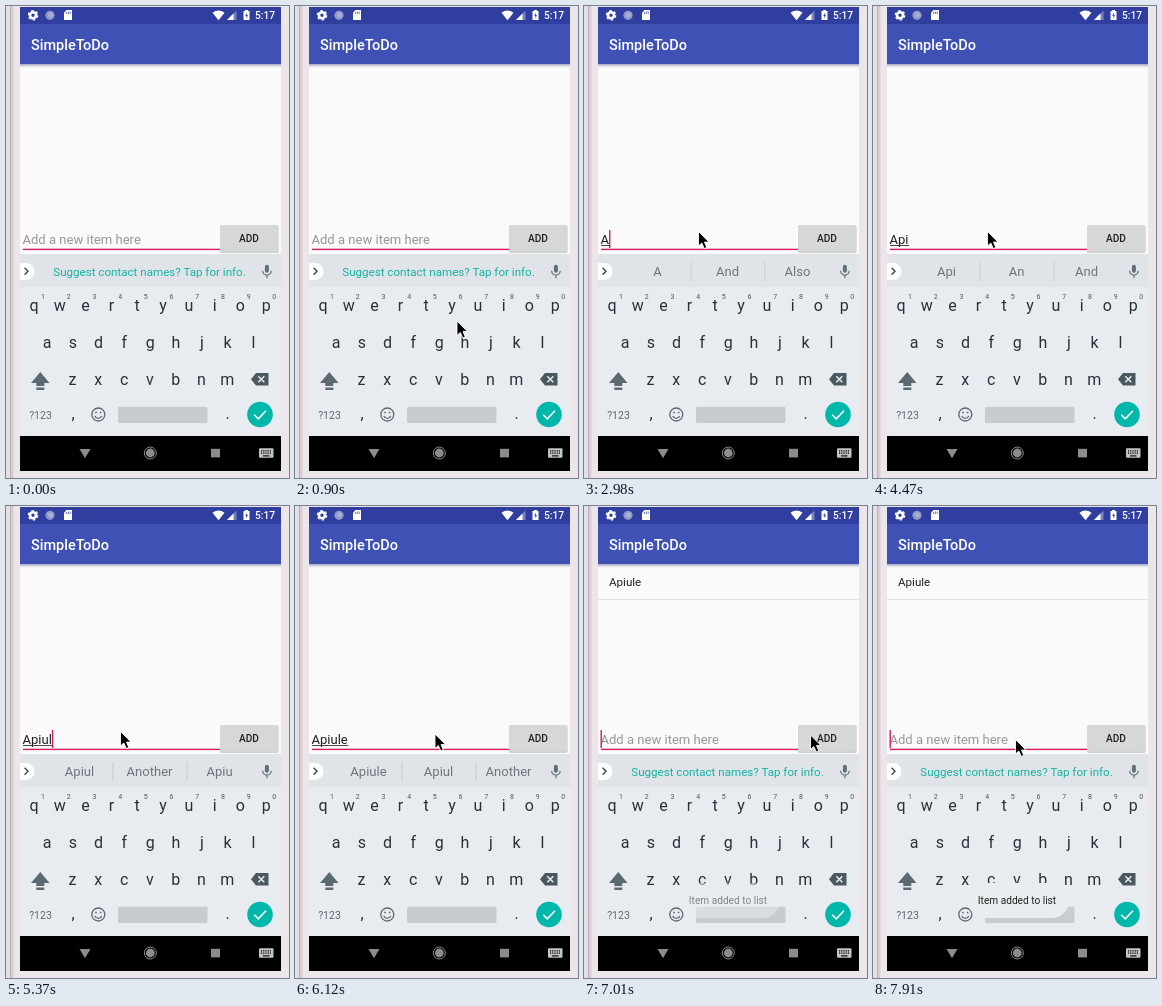
Recreate the animation shown at these times as an HTML page. Size 283 by 472 pixels, loop 8 s.

```html
<!DOCTYPE html>
<html lang="en">
<head>
<meta charset="utf-8">
<title>To-do entry</title>
<style>
  html, body { margin: 0; width: 100%; height: 100%; overflow: hidden; background: #ece6ea; }
  svg { display: block; width: 283px; height: 472px; font-family: Roboto, sans-serif; }
  .mid { text-anchor: middle; }
  .edit { font-size: 13.05px; }
  .hint { fill: #979797; }
  .medium { font-weight: 500; }
  #keys { font-size: 16px; fill: #263238; }
  #keys .digit { font-size: 7px; fill: #4c585e; }
  #words { font-size: 13.05px; fill: #6b767c; }
</style>
</head>
<body>
<svg viewBox="0 0 283 472">
  <!-- window edge -->
  <rect width="283" height="472" fill="#ece6ea"/>
  <rect width="4" height="472" fill="#e4dfe2"/>
  <rect x="4" width="1.5" height="472" fill="#bcb0b6"/>
  <rect x="5.5" width="2" height="472" fill="#d9ced4"/>

  <!-- app -->
  <rect x="14" y="58" width="261" height="191" fill="#fafafa"/>
  <rect x="14" y="1" width="261" height="17.5" fill="#303f9f"/>
  <rect x="14" y="18" width="261" height="40.5" fill="#3f51b5"/>
  <rect x="14" y="58.5" width="261" height="1.5" fill="#c6c7cc"/>
  <rect x="14" y="60" width="261" height="1.5" fill="#ececee"/>
  <text class="medium" x="25" y="44" font-size="14.5" fill="#fff">SimpleToDo</text>

  <!-- status icons -->
  <g fill="#fff">
    <circle cx="27" cy="9.3" r="3" fill="none" stroke="#fff" stroke-width="2.6"/>
    <circle cx="27" cy="9.3" r="4.7" fill="none" stroke="#fff" stroke-width="1.2" stroke-dasharray="2.6 2.32"/>
    <circle cx="44" cy="9.3" r="4.6" fill="#8f9acb"/>
    <circle cx="44.5" cy="9" r="2.4" fill="#a9b1d8"/>
    <path d="M60.5 4H66V14H58V6.7Z"/>
    <path d="M60.6 6V8M62.4 5.5V8M64.2 5.5V8" stroke="#303f9f" stroke-width=".7"/>
    <path d="M206.5 6.8Q212.5 2.4 218.5 6.8L212.5 14.2Z"/>
    <path d="M221 14H230.5V4.5Z" opacity=".35"/>
    <path d="M221 14H227.5V7.5Z"/>
    <path d="M237.5 5H239V4H242V5H243.5V14H237.5Z"/>
    <path d="M241 6.5L239.2 9.8H240.4V12.5L242 9H240.8Z" fill="#303f9f"/>
    <text class="medium" x="249" y="13" font-size="10.2">5:17</text>
  </g>

  <g id="item">
    <rect x="14" y="93" width="261" height="1" fill="#e1e1e1"/>
    <text x="25" y="80" font-size="11.6" fill="#212121">Apiule</text>
  </g>

  <!-- input row -->
  <text class="edit hint" id="hint" x="16.5" y="238">Add a new item here</text>
  <text class="edit" id="typed" x="16.5" y="238" fill="#212121"></text>
  <rect id="composing" x="17" y="239" height=".9" fill="#333"/>
  <rect x="17" y="242.7" width="197" height="1.4" fill="#d81b60"/>
  <rect id="caret" y="224" width="1.4" height="18" fill="#d81b60"/>
  <rect x="214" y="219.5" width="58.5" height="27.2" rx="1.5" fill="#c2c3c3"/>
  <rect id="button" x="214" y="219" width="58" height="26.8" rx="1.5"/>
  <text class="medium mid" x="243" y="236" font-size="10.15" fill="#212121">ADD</text>

  <!-- keyboard -->
  <rect x="14" y="248" width="261" height="182" fill="#e8ecf0"/>
  <rect x="14" y="248" width="261" height="33" fill="#e0e4e8"/>
  <path d="M14 257H20A8.5 8.5 0 0 1 20 274H14Z" fill="#fff"/>
  <path d="M18.6 261.8L22 265.3L18.6 268.8" fill="none" stroke="#37474f" stroke-width="1.4"/>
  <text class="mid" id="info" x="143.5" y="269.6" font-size="11.6" fill="#12b3a3">Suggest contact names? Tap for info.</text>
  <g id="words" class="mid">
    <path d="M107 256V275M181 256V275" stroke="#c6cbcf"/>
    <text x="73.5" y="270"></text><text x="143.5" y="270"></text><text x="213.5" y="270"></text>
  </g>
  <rect x="258.9" y="258.8" width="4" height="8" rx="2" fill="#607078"/>
  <path d="M256.6 264.8A4.3 4.3 0 0 0 265.2 264.8M260.9 269V272.3" fill="none" stroke="#607078" stroke-width="1.2"/>

  <g id="keys" class="mid"></g>
  <path d="M34.3 366L43.5 377H38.3V380H30.3V377H25Z M30.3 381.5H38.3V384H30.3Z" fill="#5b6a72"/>
  <path d="M250 367H262.5V379.5H250L245 373.2Z" fill="#4a5860"/>
  <path d="M252.3 370.3L258.3 376.3M258.3 370.3L252.3 376.3" stroke="#e8ecf0" stroke-width="1.5"/>
  <text class="mid" x="34.5" y="412.5" font-size="10.5" fill="#5b6a72">?123</text>
  <g fill="none" stroke="#5b6a72" stroke-width="1.3">
    <circle cx="92.3" cy="408.5" r="6.5"/>
    <path d="M88.8 410A3.8 3.8 0 0 0 95.8 410"/>
    <path d="M89.2 406.5H90.8M93.8 406.5H95.4" stroke-width="1.7"/>
  </g>
  <rect x="112" y="400.8" width="89.5" height="16.2" rx="1.5" fill="#c8ccd0"/>
  <circle cx="254" cy="408.5" r="12.8" fill="#00b8a9"/>
  <path d="M248.2 408.8L252.3 412.8L260 404.8" fill="none" stroke="#fff" stroke-width="1.6"/>

  <!-- navigation bar -->
  <rect x="14" y="430" width="261" height="35" fill="#000"/>
  <g fill="#8c8c8c">
    <path d="M73.5 443H84.5L79 452.3Z"/>
    <circle cx="144.3" cy="447" r="4.4"/>
    <circle cx="144.3" cy="447" r="6" fill="none" stroke="#8c8c8c"/>
    <rect x="205" y="442.8" width="9" height="8.6"/>
    <rect x="253" y="442.3" width="14.5" height="9.4" rx="1" fill="#c4c4c4"/>
    <path d="M255 444.8H266M255 447.2H266" stroke="#000" stroke-width="1.2" stroke-dasharray="1.2 1"/>
    <path d="M257 449.9H263.5" stroke="#000" stroke-width="1.1"/>
  </g>

  <g id="toast">
    <rect x="95" y="377" width="101" height="35" rx="17" fill="#eaedf0"/>
    <text class="mid" x="144" y="398.3" font-size="10.15" fill="#212121">Item added to list</text>
  </g>
  <path id="pointer" d="M0 0V14.5L3.3 11.5L5.8 17L8.3 16L6 10.6H10.5Z" fill="#000" stroke="#fff" stroke-width=".9"/>
</svg>
<script>
const LOOP = 8000;
const $ = id => document.getElementById(id);

// Latest value whose start time has been reached.
const at = (track, t) => track.findLast(([start]) => start <= t)[1];

const entry = [
  [0, ''], [2980, 'A'], [3870, 'Ap'], [4020, 'Api'], [4620, 'Apiu'],
  [5370, 'Apiul'], [5520, 'Apiule'], [7010, '']
];
const suggestions = {
  A: ['And', 'Also'], Ap: ['An', 'And'], Api: ['An', 'And'], Apiu: ['An', 'Another'],
  Apiul: ['Another', 'Apiu'], Apiule: ['Apiul', 'Another']
};
const caretToggles = [
  150, 600, 1050, 1630, 2080, 2530, 2980, 3580, 3870, 4470,
  4620, 5070, 5370, 5970, 6420, 7460, 7910
];
const pointerTrack = [
  [0, null], [450, [168, 340]], [600, [168, 336]], [900, [162, 315]],
  [1050, [142, 270]], [1200, [120, 234]], [1340, [114.5, 225.5]],
  [5970, [117, 226]], [6120, [140, 228]], [6270, [178, 230]],
  [6420, [212, 230]], [6560, [226.5, 229]],
  [7160, [214, 226]], [7310, [168, 225]], [7460, [142.5, 233.5]]
];
const toastTrack = [[0, 0], [7010, 0.5], [7160, 1]];

const label = (x, y, text, cls = '') => `<text x="${x}" y="${y}" class="${cls}">${text}</text>`;
const keyRow = (letters, x, y) => [...letters].map((c, i) => label(x + i * 25.8, y, c)).join('');
$('keys').innerHTML =
  keyRow('qwertyuiop', 28, 305) + keyRow('asdfghjkl', 41, 341.5) + keyRow('zxcvbnm', 66.5, 378.5) +
  label(67, 413, ',') + label(221.5, 413, '.') +
  [...'1234567890'].map((d, i) => label(37 + i * 25.7, 293, d, 'digit')).join('');

const show = (id, on) => $(id).setAttribute('visibility', on ? 'visible' : 'hidden');

function draw(now) {
  const t = now % LOOP;
  const text = at(entry, t);
  $('typed').textContent = text;
  const width = text ? $('typed').getComputedTextLength() : 0;
  $('composing').setAttribute('width', width);
  $('caret').setAttribute('x', 16.5 + width);
  show('caret', caretToggles.filter(start => start <= t).length % 2);
  show('hint', !text);
  show('info', !text);
  show('words', text);
  const words = text ? [text, ...suggestions[text]] : [];
  $('words').querySelectorAll('text').forEach((node, i) => node.textContent = words[i] || '');

  show('item', t >= 7010);
  $('button').setAttribute('fill', t >= 6860 && t < 7010 ? '#c4c5c5' : '#d6d7d7');
  $('toast').setAttribute('opacity', at(toastTrack, t));

  const position = at(pointerTrack, t);
  show('pointer', position);
  if (position) $('pointer').setAttribute('transform', `translate(${position})`);
  requestAnimationFrame(draw);
}
draw(0);
</script>
</body>
</html>
```
